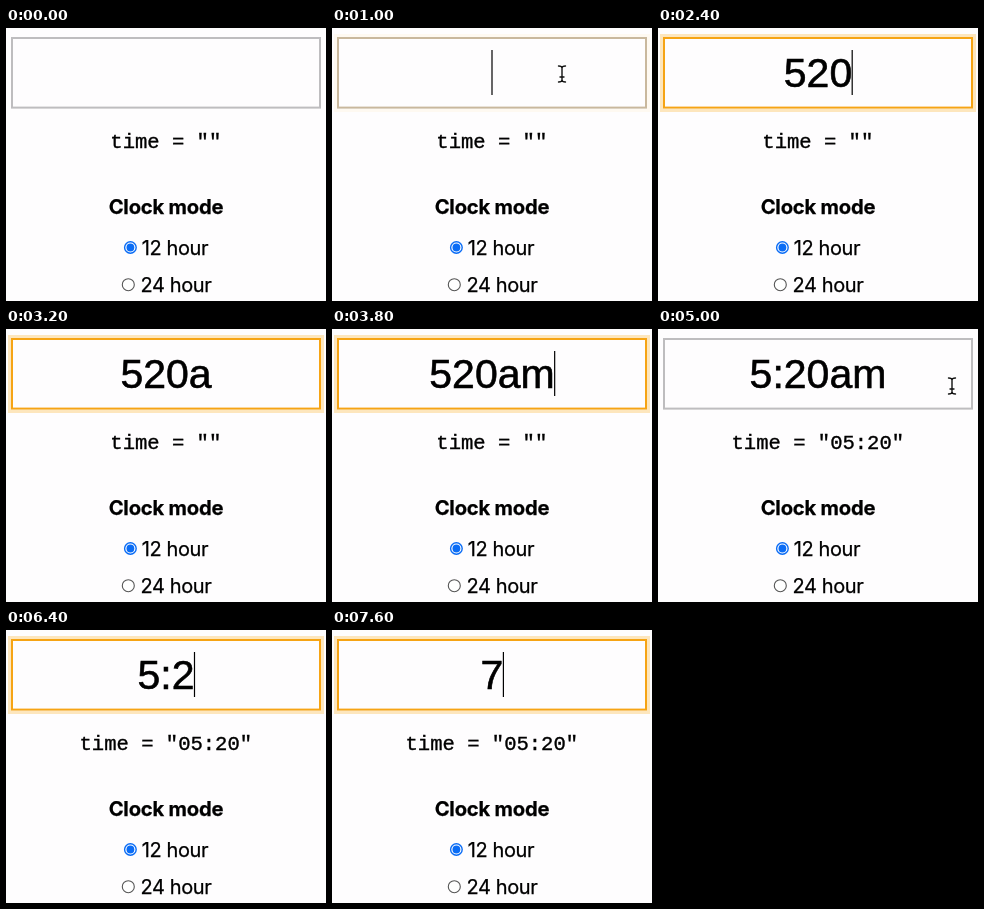
An HTML page that plays this animation: 320x273 px, repeating every 8000 ms.

```html
<!DOCTYPE html>
<html lang="en">
<head>
<meta charset="utf-8">
<title>Time input</title>
<style>
  html, body { margin: 0; width: 100%; height: 100%; overflow: hidden; background: #fefdfe; }
  svg { display: block; width: 100%; height: 100%; }
  text { fill: #000; stroke: #000; stroke-width: .25px; white-space: pre; }
  .field { font: 41px "Liberation Sans", Arial, sans-serif; text-anchor: middle; stroke-width: .6px; }
  .code { font: 20.55px "Liberation Mono", "Courier New", monospace; text-anchor: middle; stroke-width: .35px; }
  .title { font: 700 20.2px Inter, sans-serif; text-anchor: middle; letter-spacing: -.2px; }
  .label { font: 20px Inter, sans-serif; letter-spacing: -.4px; }
</style>
</head>
<body>
<svg viewBox="0 0 320 273">
  <rect id="glow" x="3.5" y="7.5" width="313" height="75" fill="none" stroke="#fde6bd" stroke-width="3"/>
  <rect id="box" x="6" y="10" width="308" height="69.6" fill="#fefdfe" stroke-width="2"/>
  <text id="value" class="field" x="160" y="58.7"></text>
  <path id="caret" d="M0 22V67" stroke="#000" stroke-width="1.2"/>
  <text id="code" class="code" x="159.8" y="120"></text>
  <text class="title" x="160" y="186">Clock mode</text>
  <circle cx="124.4" cy="219.5" r="5.8" fill="#fff" stroke="#0a6cf5" stroke-width="1.4"/>
  <circle cx="124.4" cy="219.5" r="3.9" fill="#0a6cf5"/>
  <text class="label" x="135.8" y="226.8">12 hour</text>
  <circle cx="122.3" cy="256.7" r="6" fill="#fff" stroke="#555" stroke-width="1.1"/>
  <text class="label" x="134.6" y="263.8">24 hour</text>
  <g id="pointer" fill="none" stroke-linecap="round">
    <defs><path id="beam" d="M-3.5-8Q0-8 0-6Q0-8 3.5-8M0-6V6M-3.5 8Q0 8 0 6Q0 8 3.5 8M-2 3H2"/></defs>
    <use href="#beam" stroke="#fff" stroke-width="3"/>
    <use href="#beam" stroke="#111" stroke-width="1.4"/>
  </g>
</svg>
<script>
const LOOP = 8000, STEP = 200;
const $ = id => document.getElementById(id);
const el = Object.fromEntries(["glow", "box", "value", "caret", "code", "pointer"].map(id => [id, $(id)]));

// Each track is a list of [start, value]; the latest started entry holds.
const typed = [[0, ""], [1600, "5"], [2000, "52"], [2400, "520"], [2800, "520a"], [3800, "520am"], [4000, "5:20am"],
  [6000, "5:20a"], [6200, "5:20"], [6400, "5:2"], [6600, "5:"], [6800, "5"], [7000, ""], [7600, "7"]];
const focus = [[0, 0], [1000, .2], [1200, .8], [1400, 1], [4000, .4], [4200, 0], [5200, .2], [5400, .8], [5600, 1]];
const caretOn = [[0, 0], [1000, 1], [3200, 0], [3800, 1], [4000, 0], [5200, 1], [7400, 0], [7600, 1]];
const visits = [
  { from: 200, stop: 800, until: 1400, start: [300, 59], end: [230, 46] },
  { from: 5000, stop: 5400, until: 6000, start: [294, 57], end: [258, 49] }
];

const at = (track, t) => track.findLast(([start]) => start <= t)[1];
const mix = (a, b, k) => a.map((v, i) => v + (b[i] - v) * k);

const advance = { ":": .278, m: .833 };
const textWidth = s => 41 * [...s].reduce((w, c) => w + (advance[c] || .556), 0);

function draw(time) {
  const t = Math.floor(time % LOOP / STEP) * STEP;
  const text = at(typed, t), level = at(focus, t);

  el.value.textContent = text;
  el.code.textContent = `time = "${t < 4000 ? "" : "05:20"}"`;
  el.box.setAttribute("stroke", `rgb(${mix([190, 189, 191], [246, 164, 20], level).map(Math.round)})`);
  el.glow.setAttribute("opacity", level);
  el.caret.setAttribute("opacity", at(caretOn, t));
  el.caret.setAttribute("transform", `translate(${160 + textWidth(text) / 2})`);

  const visit = visits.find(v => t >= v.from && t < v.until);
  el.pointer.setAttribute("opacity", visit ? 1 : 0);
  if (visit) {
    const k = Math.min(1, (t - visit.from) / (visit.stop - visit.from));
    el.pointer.setAttribute("transform", `translate(${mix(visit.start, visit.end, 1 - (1 - k) ** 2)})`);
  }
}

function tick() {
  draw(performance.now());
  requestAnimationFrame(tick);
}
tick();
</script>
</body>
</html>
```
